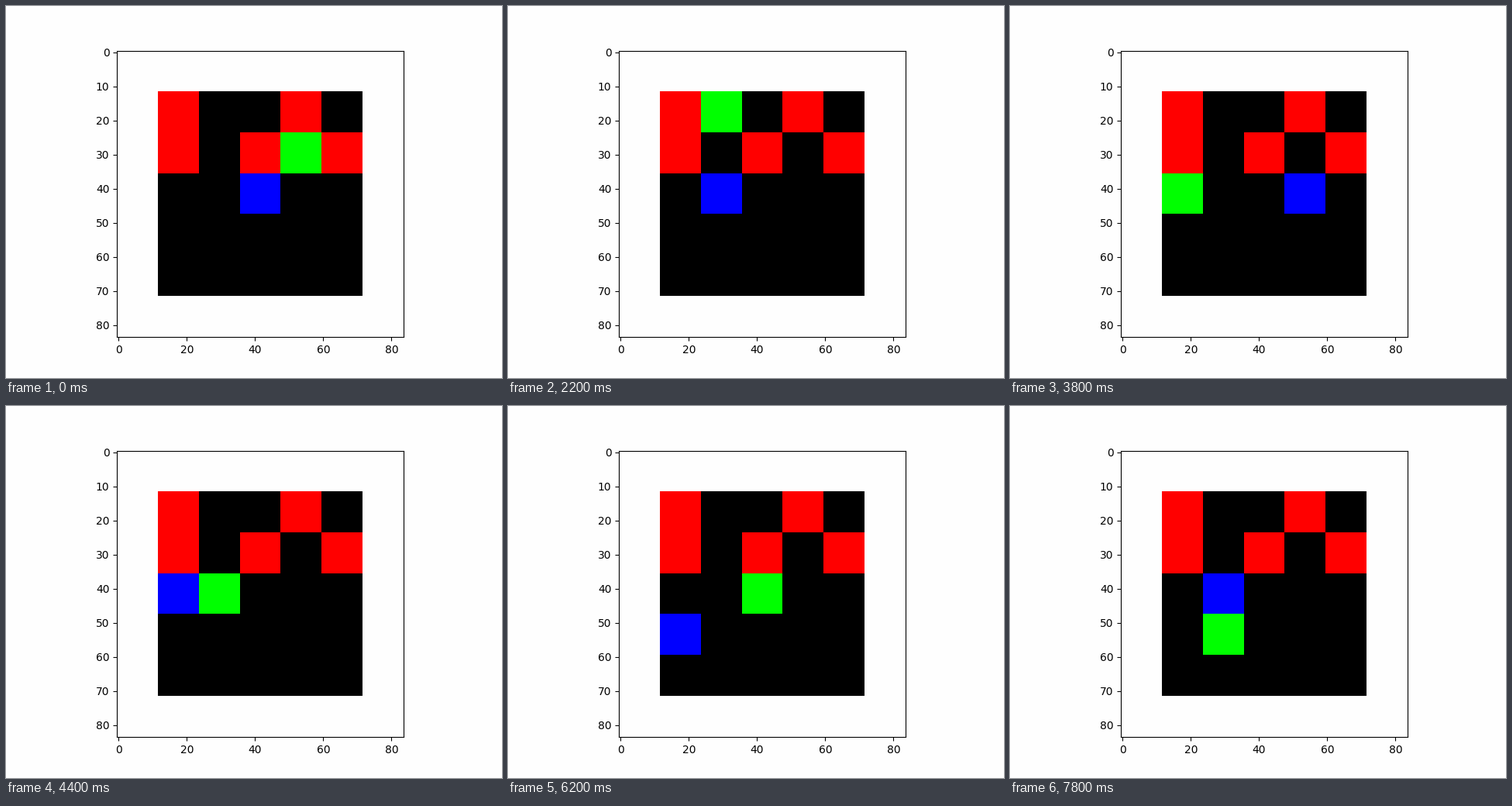
Recreate the animation shown at these times as a matplotlib script. Size 640 px wide and 480 px high, loop 8 s.

```python
import numpy as np
import matplotlib.pyplot as plt
from matplotlib.animation import FuncAnimation

SIZE, CELL, FRAMES = 5, 12, 40
PAPER = "#fefefe"
RED, GREEN, BLUE = (255, 0, 0), (0, 255, 0), (0, 0, 255)

START = (2, 2)
FIRES = [(0, 0), (3, 0), (0, 1), (2, 1), (4, 1)]
GOALS = [(3, 1), (1, 1), (3, 2), (1, 0), (2, 3), (3, 2), (0, 2),
         (1, 2), (3, 4), (0, 3), (2, 2), (1, 0), (1, 3)]
LEFT, RIGHT, UP, DOWN = (-1, 0), (1, 0), (0, -1), (0, 1)
MOVES = [LEFT, RIGHT, UP, DOWN]


def shift(cell, move):
    return cell[0] + move[0], cell[1] + move[1]


def is_free(cell):
    return cell not in FIRES and all(0 <= c < SIZE for c in cell)


def distances(goal):
    """Steps from each free cell to the goal, found breadth first."""
    dist, queue = {goal: 0}, [goal]
    for cell in queue:
        for move in MOVES:
            nxt = shift(cell, move)
            if is_free(nxt) and nxt not in dist:
                dist[nxt] = dist[cell] + 1
                queue.append(nxt)
    return dist


def walk(hero, goal):
    """Yield a shortest route: straight on if possible, else sideways first."""
    dist, heading = distances(goal), LEFT
    while hero != goal:
        for move in [heading] + MOVES:
            nxt = shift(hero, move)
            if dist.get(nxt, np.inf) < dist[hero]:
                hero, heading = nxt, move
                break
        yield hero


def play():
    """Return the (hero, goal) cells of each frame."""
    states, hero = [(START, GOALS[0])], START
    for goal, following in zip(GOALS, GOALS[1:] + GOALS[:1]):
        for hero in walk(hero, goal):
            states.append((hero, following if hero == goal else goal))
    return states[:FRAMES]


def render(hero, goal):
    grid = np.full((SIZE + 2, SIZE + 2, 3), 254, dtype=np.uint8)
    grid[1:-1, 1:-1] = 0
    cells = [(fire, RED) for fire in FIRES] + [(goal, GREEN), (hero, BLUE)]
    for (x, y), color in cells:
        grid[y + 1, x + 1] = color
    return grid.repeat(CELL, axis=0).repeat(CELL, axis=1)


states = play()
fig, ax = plt.subplots(figsize=(6.4, 4.8), dpi=100, facecolor=PAPER)
ax.set_facecolor(PAPER)
image = ax.imshow(render(*states[0]), interpolation="nearest")


def update(i):
    image.set_data(render(*states[i]))
    return [image]


anim = FuncAnimation(fig, update, frames=FRAMES, interval=200,
                     repeat=True, repeat_delay=0)
plt.show()
```
